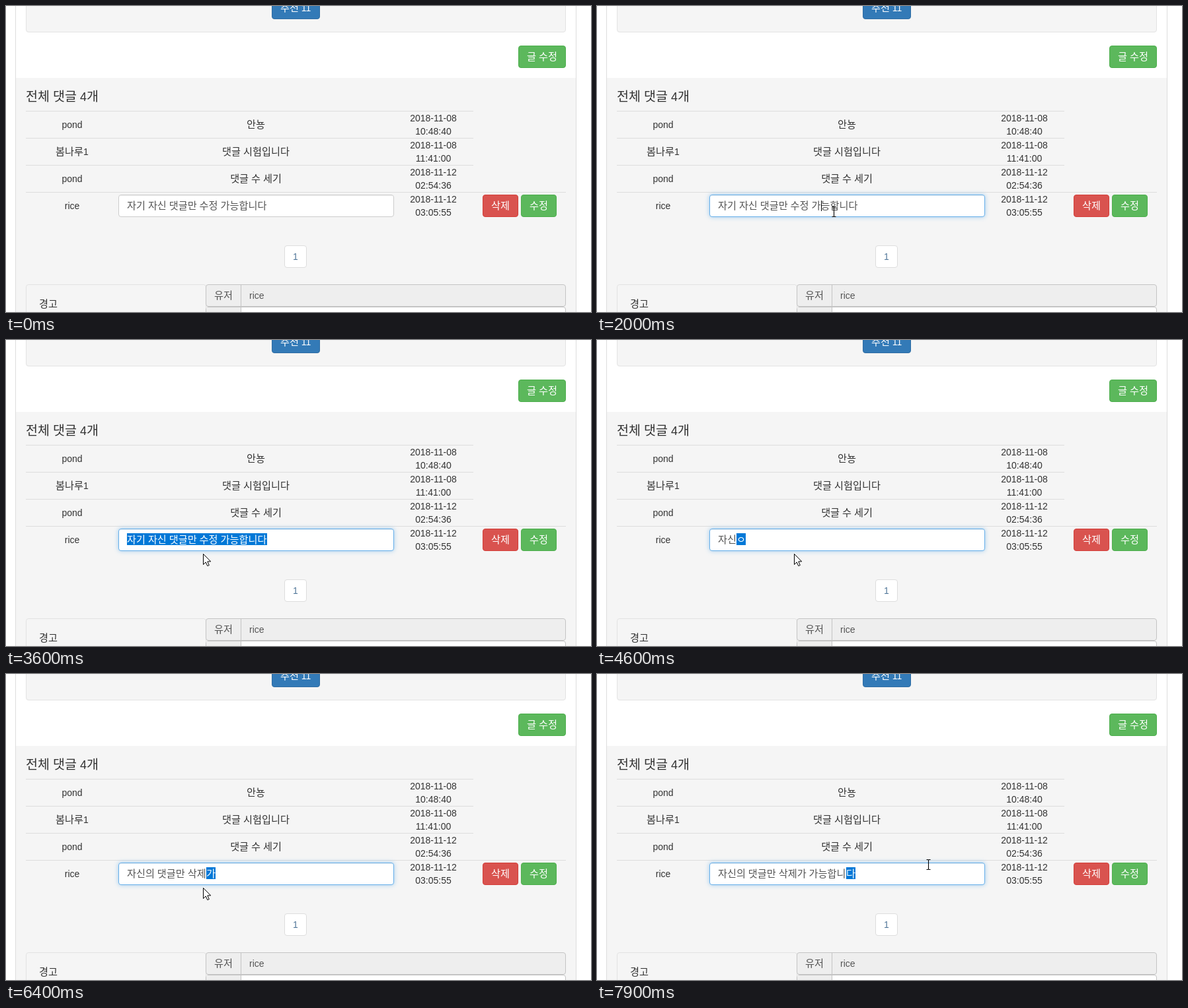
Recreate the animation shown at these times as an HTML page. Size 885 by 464 pixels, loop 8000 ms.

```html
<!DOCTYPE html>
<html lang="ko">
<head>
<meta charset="utf-8">
<title>댓글 수정</title>
<style>
  html, body { margin: 0; width: 100%; height: 100%; overflow: hidden; background: #fff; }
  svg { display: block; }
  text { font: 14px "Liberation Sans", Arial, sans-serif; white-space: pre; }
  .ko { font-family: "Noto Sans CJK KR", "Noto Sans CJK", sans-serif; }
</style>
</head>
<body>
<svg id="stage" width="885" height="464" viewBox="0 0 885 464" xmlns="http://www.w3.org/2000/svg">
  <defs>
    <filter id="blur" x="-10%" y="-60%" width="120%" height="220%"><feGaussianBlur stdDeviation="3.5"/></filter>
  </defs>
  <g id="page"></g>
  <g id="field">
    <rect id="glow" x="170" y="286" width="417" height="34" rx="4" fill="#66afe9" filter="url(#blur)"/>
    <rect id="box" x="170.5" y="286.5" width="416" height="33" rx="3.5" fill="#fff"/>
    <path d="M173 287.5H584" stroke="#000" stroke-opacity=".06"/>
    <rect id="mark" y="293" height="18" fill="#0078d7"/>
    <g id="value"></g>
    <rect id="caret" y="295" width="1" height="16" fill="#000"/>
  </g>
  <g id="front"></g>
  <path id="arrow" d="M.5 .5V16.5L4.2 12.9L6.8 18.6L9.3 17.5L6.8 11.9H11.7Z" fill="#fff" stroke="#000"/>
  <path id="beam" d="M-3 -7.5H-1L0 -7L1 -7.5H3M0 -7V7M-3 7.5H-1L0 7L1 7.5H3" fill="none" stroke="#000" stroke-width="1.1"/>
</svg>
<script>
const NS = "http://www.w3.org/2000/svg";
const $ = id => document.getElementById(id);
const LOOP = 8000, TICK = 100, LEFT = 183, BASE = 308;

function add(parent, tag, attrs) {
  const el = document.createElementNS(NS, tag);
  for (const k in attrs) el.setAttribute(k, attrs[k]);
  parent.appendChild(el);
  return el;
}

// Hangul is set a little larger so that one syllable fills one em.
function label(parent, str, x, y, fill = "#333", anchor = "start", size = 14) {
  const el = add(parent, "text", { x, y, fill, "text-anchor": anchor });
  el.style.fontSize = size + "px";
  for (const run of str.match(/[ㄱ-ㆎ가-힣]+|[^ㄱ-ㆎ가-힣]+/g) || []) {
    const span = add(el, "tspan", {});
    span.textContent = run;
    if (run >= "ㄱ") {
      span.setAttribute("class", "ko");
      span.style.fontSize = size / 0.92 + "px";
    }
  }
  return el;
}

function panel(parent, x, y, w, h, fill, stroke, rx = 3.5) {
  return add(parent, "rect", { x: x + .5, y: y + .5, width: w - 1, height: h - 1, rx, fill, stroke });
}

function button(parent, str, x, y, w, fill, stroke, ink = "#fff") {
  panel(parent, x, y, w, 34, fill, stroke);
  label(parent, str, x + 13, y + 22, ink);
}

function rule(parent, d, stroke = "#ddd") {
  add(parent, "path", { d, stroke, fill: "none" });
}

function buildPage() {
  const p = $("page"), f = $("front");
  add(p, "rect", { x: 15, y: 109, width: 847, height: 355, fill: "#f5f5f5" });
  rule(p, "M14.5 0V464M862.5 0V464");
  panel(p, 30, -40, 817, 80, "#f5f5f5", "#e3e3e3");
  button(p, "추천 11", 402, -14, 73, "#337ab7", "#2e6da4");
  button(p, "글 수정", 775, 60, 72, "#5cb85c", "#4cae4c");
  label(p, "전체 댓글 4개", 30, 144, "#333", "start", 18);

  const rows = [
    ["pond", "안뇽", "2018-11-08", "10:48:40"],
    ["봄나루1", "댓글 시험입니다", "2018-11-08", "11:41:00"],
    ["pond", "댓글 수 세기", "2018-11-12", "02:54:36"],
    ["rice", "", "2018-11-12", "03:05:55"]
  ];
  rows.forEach(([who, note, day, hour], i) => {
    const y = 159 + 41 * i;
    rule(p, `M30 ${y + .5}H${i < 3 ? 707 : 847}`);
    label(p, who, 100, y + 26, "#333", "middle");
    label(p, note, 378, y + 26, "#333", "middle");
    label(p, day, 646.5, y + 16, "#333", "middle");
    label(p, hour, 646.5, y + 36, "#333", "middle");
  });

  button(f, "삭제", 721, 286, 54, "#d9534f", "#d43f3a");
  button(f, "수정", 779, 286, 54, "#5cb85c", "#4cae4c");
  button(f, "1", 421, 363, 34, "#fff", "#ddd", "#52789a");

  panel(f, 30, 422, 273, 80, "#f5f5f5", "#e3e3e3");
  label(f, "경고", 50, 457);
  panel(f, 302, 422, 545, 34, "#eee", "#c4c4c4");
  panel(f, 302, 456, 545, 34, "#fff", "#c4c4c4");
  add(f, "rect", { x: 303, y: 457, width: 52, height: 7, fill: "#eee" });
  rule(f, "M355.5 422V464", "#c4c4c4");
  label(f, "유저", 315, 444, "#555");
  label(f, "rice", 368, 444, "#555");
}

const OLD = "자기 자신 댓글만 수정 가능합니다";

// time, settled text, syllable being composed
const TYPING = [
  [4100, "", "ㅈ"], [4300, "", "자"], [4400, "자", "시"], [4500, "자", "신"],
  [4600, "자신", "ㅇ"], [4700, "자신", "으"], [4800, "자신", "의"], [4900, "자신의 ", ""],
  [5000, "자신의 ", "ㄷ"], [5100, "자신의 ", "대"], [5200, "자신의 ", "댓"],
  [5300, "자신의 댓", "그"], [5400, "자신의 댓", "글"], [5500, "자신의 댓글", "마"],
  [5600, "자신의 댓글", "만"], [5800, "자신의 댓글만 ", ""], [5900, "자신의 댓글만 ", "ㅅ"],
  [6000, "자신의 댓글만 ", "사"], [6200, "자신의 댓글만 ", "삭"], [6300, "자신의 댓글만 삭", "제"],
  [6400, "자신의 댓글만 삭제", "가"], [6500, "자신의 댓글만 삭제가 ", ""],
  [6600, "자신의 댓글만 삭제가 ", "ㄱ"], [6700, "자신의 댓글만 삭제가 ", "가"],
  [6800, "자신의 댓글만 삭제가 가", "느"], [6900, "자신의 댓글만 삭제가 가", "능"],
  [7000, "자신의 댓글만 삭제가 가능", "ㅎ"], [7100, "자신의 댓글만 삭제가 가능", "하"],
  [7200, "자신의 댓글만 삭제가 가능", "합"], [7300, "자신의 댓글만 삭제가 가능합", "ㄴ"],
  [7400, "자신의 댓글만 삭제가 가능합", "니"], [7500, "자신의 댓글만 삭제가 가능합니", "ㄷ"],
  [7600, "자신의 댓글만 삭제가 가능합니", "다"]
];

// time, x, y, shape
const PATH = [
  [100, 834, 102, "arrow"], [400, 655, 305, "arrow"], [500, 575, 343, "arrow"],
  [600, 490, 316, "beam"], [700, 444, 304, "beam"], [1400, 444, 304, "beam"],
  [1800, 344, 305, "beam"], [1900, 344, 305, "beam"], [2000, 358, 312, "beam"],
  [2100, 414, 307, "beam"], [2600, 414, 307, "beam"], [2700, 417, 308, "beam"],
  [2900, 417, 308, "beam"], [3200, 147, 320, "beam"], [3300, 147, 320, "beam"],
  [3400, 180, 319, "arrow"], [3600, 298, 324, "arrow"], [7800, 298, 324, "arrow"],
  [7900, 501, 289, "beam"]
];

const width = s => [...s].reduce((w, c) => w + (c === " " ? 4 : 14), 0);
const last = (list, t) => list.filter(k => k[0] <= t).pop();

function pointer(t) {
  const a = last(PATH, t);
  if (!a) return null;
  const b = PATH[PATH.indexOf(a) + 1] || a;
  const u = b === a ? 0 : (t - a[0]) / (b[0] - a[0]);
  return { x: Math.round(a[1] + (b[1] - a[1]) * u), y: Math.round(a[2] + (b[2] - a[2]) * u), shape: a[3] };
}

function indexAt(x) {
  let i = 0;
  while (i < OLD.length && LEFT + width(OLD.slice(0, i)) + 7 < x) i++;
  return i;
}

function content(t, mouse) {
  const typed = last(TYPING, t);
  if (typed) return { text: typed[1], picked: typed[2], caret: typed[2] ? -1 : width(typed[1]) };
  if (t >= 3000) {
    const i = indexAt(t < 3200 ? mouse.x : 0);
    return { text: OLD.slice(0, i), picked: OLD.slice(i), caret: -1 };
  }
  let caret = -1;
  if ((t >= 1300 && t < 1800) || (t >= 2300 && t < 2800)) caret = width(OLD);
  else if (t >= 1900 && t < 2200) caret = width(OLD.slice(0, indexAt(344)));
  return { text: OLD, picked: "", caret };
}

function mix(a, b, u) {
  return `rgb(${a.map((v, i) => Math.round(v + (b[i] - v) * u))})`;
}

function draw(time) {
  const t = Math.floor(time / TICK) * TICK;
  const mouse = pointer(t);
  for (const id of ["arrow", "beam"]) {
    const on = mouse && mouse.shape === id;
    $(id).style.display = on ? "" : "none";
    if (on) $(id).setAttribute("transform", `translate(${mouse.x + (id === "beam" ? .5 : 0)} ${mouse.y})`);
  }

  const focus = Math.max(0, Math.min(1, (t - 1200) / 200));
  $("glow").setAttribute("opacity", .6 * focus);
  $("box").setAttribute("stroke", mix([204, 204, 204], [102, 175, 233], focus));

  const { text, picked, caret } = content(t, mouse);
  const start = LEFT + width(text);
  $("value").replaceChildren();
  label($("value"), text, LEFT, BASE, "#555");
  label($("value"), picked, start, BASE, "#fff");
  $("mark").setAttribute("x", start);
  $("mark").setAttribute("width", width(picked));
  $("caret").style.display = caret < 0 ? "none" : "";
  $("caret").setAttribute("x", LEFT + caret);
}

let shown = -1;
function frame() {
  const time = performance.now() % LOOP;
  const tick = Math.floor(time / TICK);
  if (tick !== shown) draw(time);
  shown = tick;
  requestAnimationFrame(frame);
}

buildPage();
frame();
</script>
</body>
</html>
```
